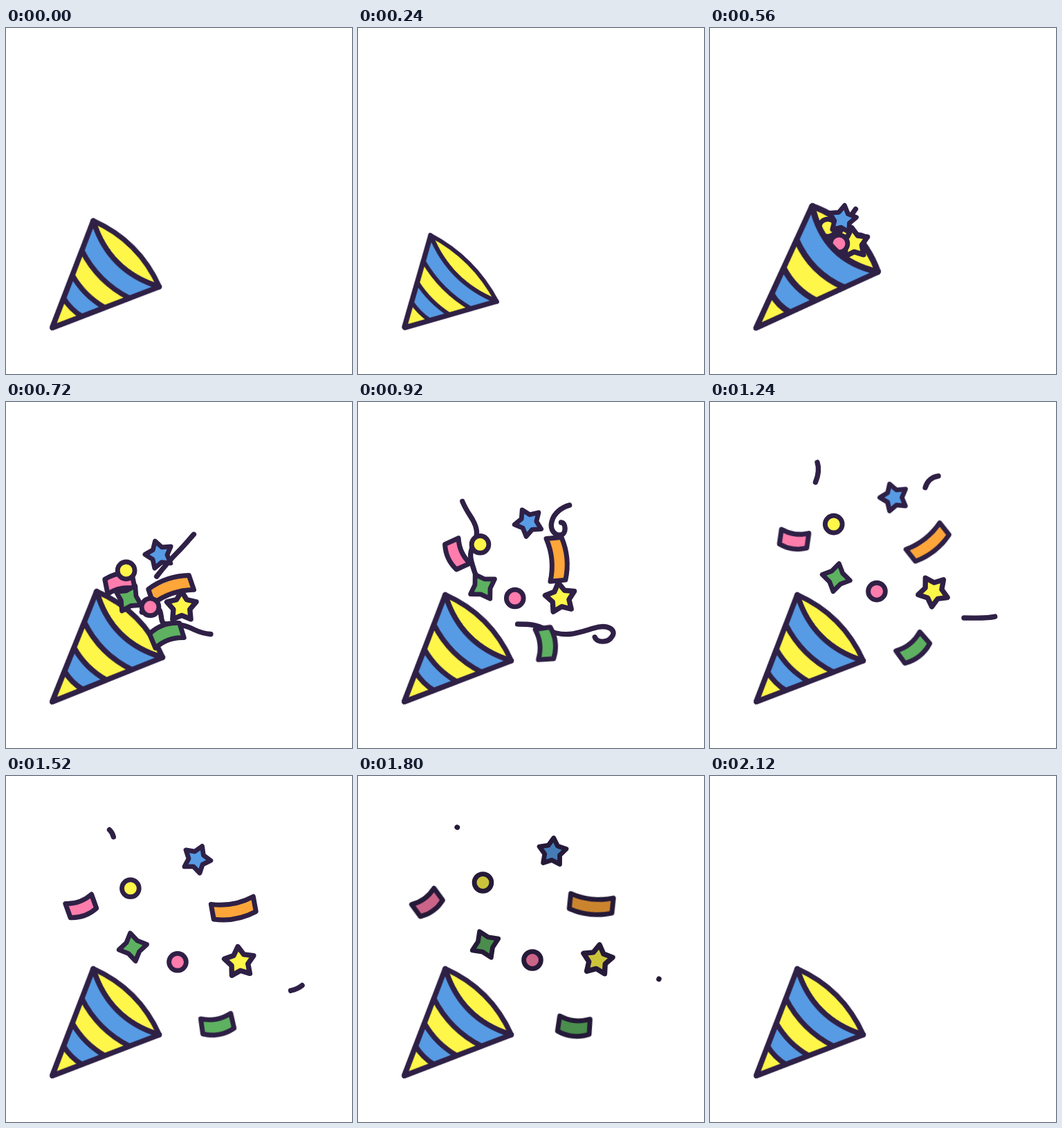
Recreate the animation shown at these times as an HTML page without scripts. Size 500 px wide and 500 px high, loop 2160 ms.

```html
<!DOCTYPE html>
<html lang="en">
<head>
<meta charset="utf-8">
<title>Party popper</title>
<style>
@property --p { syntax: "<number>"; inherits: true; initial-value: 0; }

html, body { margin: 0; width: 100%; height: 100%; overflow: hidden; background: #fff; }

svg {
  --ink: #2f2046;
  --yellow: #fff64a;
  --blue: #579be4;
  --pink: #ff7dac;
  --green: #5db160;
  --orange: #ffa63a;
  display: block;
  width: 100vw;
  height: 100vh;
  stroke: var(--ink);
  stroke-width: 7.4;
  stroke-linejoin: round;
  stroke-linecap: round;
}
.y { fill: var(--yellow); }
.b { fill: var(--blue); }
.p { fill: var(--pink); }
.g { fill: var(--green); }
.o { fill: var(--orange); }

.cone, .confetti, .fast, .late, .ribbons path {
  animation: 2160ms linear infinite;
}

/* The cone squashes and stretches along its own axis */
.cone { animation-name: squash; animation-timing-function: ease-in-out; }
@keyframes squash {
  0%, 37.04%, 100% { transform: scaleX(1); }
  11.11% { transform: scaleX(.803); }
  25.93% { transform: scaleX(1.2); }
}

/* Confetti shows from the pop and darkens before it vanishes */
.confetti { animation-name: show; }
@keyframes show {
  0%, 18.5% { opacity: 0; filter: brightness(1); }
  18.52% { opacity: 1; }
  79.63% { filter: brightness(1); }
  98.1% { opacity: 1; filter: brightness(0); }
  98.11%, 100% { opacity: 0; filter: brightness(0); }
}

/* --p runs from the mouth (0) to the resting place (1) */
.fast { animation-name: fly; stroke-width: 6.8; }
@keyframes fly {
  0%, 18.52% { --p: 0; }
  25.93% { --p: .286; animation-timing-function: cubic-bezier(.33, .49, .67, .78); }
  42.59% { --p: .725; animation-timing-function: cubic-bezier(.33, .55, .67, .77); }
  57.41% { --p: .88; animation-timing-function: cubic-bezier(.33, .51, .67, .84); }
  83.33%, 100% { --p: 1; }
}
.late { animation-name: fly-late; stroke-width: 7; }
@keyframes fly-late {
  0% { --p: 0; opacity: 0; }
  25.93% { --p: 0; animation-timing-function: cubic-bezier(.33, .58, .67, .87); }
  26.4% { opacity: 0; }
  26.41% { opacity: 1; }
  42.59% { --p: .725; animation-timing-function: cubic-bezier(.33, .55, .67, .77); }
  57.41% { --p: .88; animation-timing-function: cubic-bezier(.33, .51, .67, .84); }
  83.33%, 100% { --p: 1; opacity: 1; }
}

/* x, y: rest; dx, dy: distance flown; r: rest angle; a: turn; bx, by: bend */
.bit {
  --left: calc(1 - var(--p));
  --bend: calc(var(--p) * var(--left));
  transform:
    translate(
      calc((var(--x) - var(--left) * var(--dx) + var(--bend) * var(--bx, 0)) * 1px),
      calc((var(--y) - var(--left) * var(--dy) + var(--bend) * var(--by, 0)) * 1px))
    rotate(calc((var(--r, 0) - var(--left) * var(--a, 0)) * 1deg));
}

/* Ribbons: the dash is the visible length, the offset moves its tail */
.ribbons { fill: none; }
.ribbons .r1 { animation-name: ribbon1; }
.ribbons .r2 { animation-name: ribbon2; }
.ribbons .r3 { animation-name: ribbon3; }
@keyframes ribbon1 {
  0%, 22% { stroke-dasharray: 0 999; stroke-dashoffset: 0; }
  25.93% { stroke-dasharray: 20 999; stroke-dashoffset: 0; }
  42.59% { stroke-dasharray: 123 999; stroke-dashoffset: -80; }
  51.85% { stroke-dasharray: 60 999; stroke-dashoffset: -186; }
  57.41% { stroke-dasharray: 30 999; stroke-dashoffset: -232; }
  79%, 100% { stroke-dasharray: .5 999; stroke-dashoffset: -280.4; }
}
@keyframes ribbon2 {
  0%, 20% { stroke-dasharray: 0 999; stroke-dashoffset: 0; }
  25.93% { stroke-dasharray: 76 999; stroke-dashoffset: -10; }
  42.59% { stroke-dasharray: 88 999; stroke-dashoffset: -208; }
  51.85% { stroke-dasharray: 45 999; stroke-dashoffset: -288; }
  57.41% { stroke-dasharray: 27 999; stroke-dashoffset: -324; }
  74%, 100% { stroke-dasharray: 1 999; stroke-dashoffset: -370; }
}
@keyframes ribbon3 {
  0%, 20% { stroke-dasharray: 0 999; stroke-dashoffset: 0; }
  25.93% { stroke-dasharray: 65 999; stroke-dashoffset: -5; }
  42.59% { stroke-dasharray: 182 999; stroke-dashoffset: -94; }
  51.85% { stroke-dasharray: 85 999; stroke-dashoffset: -255; }
  57.41% { stroke-dasharray: 45 999; stroke-dashoffset: -318; }
  79%, 100% { stroke-dasharray: .5 999; stroke-dashoffset: -392.4; }
}
</style>
</head>
<body>
<svg viewBox="0 0 500 500">
  <defs>
    <path id="star" d="M0-20.5 6.8-9.3 19.5-6.3 10.9 3.6 12 16.6 0 11.5-12 16.6-10.9 3.6-19.5-6.3-6.8-9.3Z"/>
  </defs>

  <g transform="translate(67 433) rotate(-45)">
    <g class="cone">
      <path class="y" d="M151-67.5Q177 0 151 67.5Q115 0 151-67.5Z"/>
    </g>
  </g>

  <g class="confetti">
    <g class="ribbons">
      <path class="r1" pathLength="281" d="M165 335C172 300 176 262 168 244C163 228 160 222 166 208C175 192 172 181 165 169C160 161 155 154 151 144C148 132 148 126 152 117C156 108 158 96 155 87C153 80 149 76 143 74"/>
      <path class="r2" pathLength="351" d="M165 335C190 285 225 240 250 215C265 200 280 178 293 174C301 174 301 190 294 192C284 194 277 184 280 173C283 160 295 152 306 149C316 144 309 134 311 124C314 113 322 108 330 107"/>
      <path class="r3" pathLength="393" d="M165 335C185 300 215 295 222 301C226 308 222 321 232 321C250 321 258 322 272 329C300 342 320 333 340 327C362 320 374 330 367 339C361 349 344 348 342 339C341 325 352 312 367 312C390 312 400 313 412 310C424 307 432 301 435 293"/>
    </g>

    <g class="late">
      <path class="bit p" style="--x:101;--y:184;--dx:-57;--dy:-152;--bx:128;--by:-28;--r:-36;--a:-370"
        d="M-20-12.5Q0-4.5 20-12.5L20 9Q0 17-20 9Z"/>
      <path class="bit o" style="--x:337;--y:186;--dx:179;--dy:-150;--r:6;--a:370"
        d="M-31-13Q0-3 31-13L31 9Q0 19-31 9Z"/>
      <path class="bit g" style="--x:312;--y:363;--dx:145;--dy:51;--r:6;--a:372"
        d="M-22-14Q0-5 22-14L23 8Q0 18-23 8Z"/>
    </g>

    <g class="fast">
      <path class="bit g" style="--x:184;--y:243.5;--dx:14.5;--dy:-85;--r:-24;--a:-300"
        d="M0-20.5 8-8 20.5 0 8 8 0 20.5-8 8-20.5 0-8-8Z"/>
      <circle class="bit y" r="12.4" style="--x:180.5;--y:154;--dx:14.5;--dy:-189"/>
      <g class="bit b" style="--x:281;--y:110;--dx:126;--dy:-234;--r:5;--a:-410">
        <use href="#star"/>
      </g>
      <g class="bit y" style="--x:346;--y:266;--dx:195;--dy:-63;--r:8;--a:322">
        <use href="#star" transform="scale(1.09)"/>
      </g>
      <circle class="bit p" r="12.4" style="--x:252;--y:266;--dx:92;--dy:-64"/>
    </g>
  </g>

  <g transform="translate(67 433) rotate(-45)">
    <g class="cone">
      <path class="b" d="M0 0L151-67.5Q115 0 151 67.5Z"/>
      <path class="y" d="M0 0L109-48.7Q93 0 109 48.7Z"/>
      <path class="b" d="M0 0L74-33Q65 0 74 33Z"/>
      <path class="y" d="M0 0L41.7-18.6Q37 0 41.7 18.6Z"/>
    </g>
  </g>
</svg>
</body>
</html>
```
